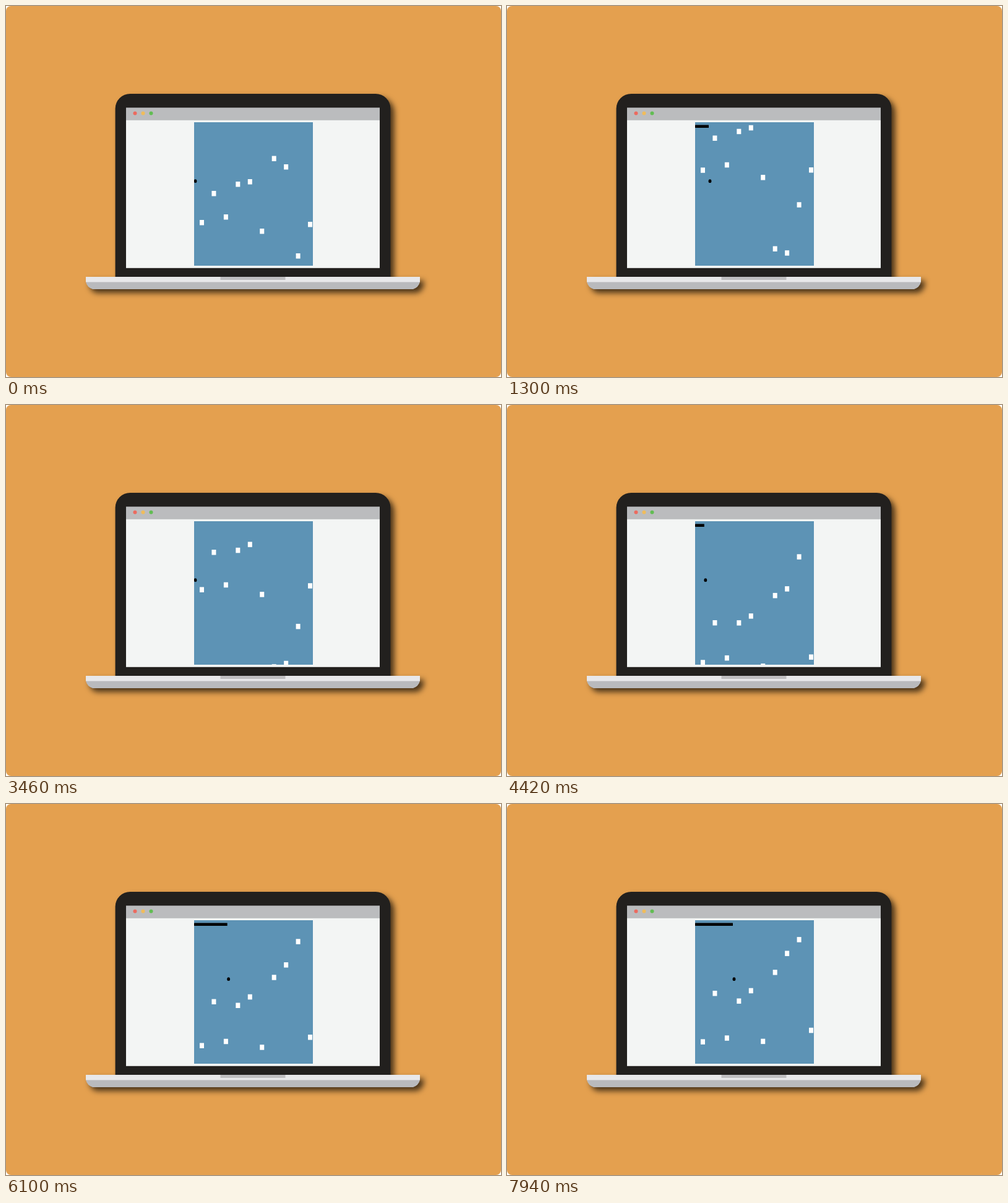
An HTML page for the animation above (8 s loop, 800 px wide and 600 px high).

```html
<!DOCTYPE html>
<html lang="en">
<head>
<meta charset="utf-8">
<title>Dodging game on a laptop</title>
<style>
  html, body { margin: 0; width: 100%; height: 100%; overflow: hidden; background: #fff; }
  svg { display: block; width: 100%; height: 100%; }
</style>
</head>
<body>
<svg viewBox="0 0 800 600" xmlns="http://www.w3.org/2000/svg">
  <defs>
    <filter id="shadow" x="-10%" y="-20%" width="120%" height="150%" color-interpolation-filters="sRGB">
      <feDropShadow dx="6" dy="6" stdDeviation="5" flood-color="#000" flood-opacity=".68"/>
    </filter>
    <clipPath id="field"><rect x="304" y="188" width="192" height="232"/></clipPath>
  </defs>
  <rect width="800" height="600" rx="8" fill="#e4a04f"/>
  <g filter="url(#shadow)">
    <path d="M176.6 438V166a24 24 0 0 1 24-24H597.4a24 24 0 0 1 24 24V438Z" fill="#22201e"/>
    <path d="M129 446H669Q667 455 658 458H140Q131 455 129 446Z" fill="#b9babd"/>
    <rect x="129" y="438" width="540" height="8.5" fill="#e8e8ea"/>
  </g>
  <rect x="346.5" y="438" width="105" height="5" fill="#bfbec0"/>
  <rect x="194" y="184" width="410" height="239.8" fill="#f3f5f4"/>
  <rect x="194" y="164.4" width="410" height="20.4" fill="#bbbcbe"/>
  <circle cx="208.5" cy="173.5" r="3" fill="#ec6a5f"/>
  <circle cx="221.5" cy="173.5" r="3" fill="#f0bc5b"/>
  <circle cx="234.5" cy="173.5" r="3" fill="#62bd53"/>
  <g clip-path="url(#field)">
    <rect x="304" y="188" width="192" height="232" fill="#5d93b5"/>
    <g id="blocks" fill="#fff"></g>
    <rect id="bar" x="304" y="192.4" height="4.6"/>
    <ellipse id="player" cy="283.2" rx="2.4" ry="2.9"/>
  </g>
</svg>
<script>
const LOOP = 8000, STEP = 80, FIRST_HOLD = 180;
const FIELD = { x: 304, y: 188, height: 232 };

// Each block falls steadily and re-enters at the top: [first height, fall per step].
const falls = [
  [158, 9.82], [111, 9.5], [149, 9.85], [96, 9.78], [92, 9.65],
  [172, 9.67], [54.5, 9.73], [68, 9.28], [212, 9.95], [161, 9.6]
];

// The player runs right up to a reach, until a hit sends it back to the left edge.
const RUN_RATE = 1.85;
const attempts = [
  { start: 3, hit: 22, reach: 22 },
  { start: 25, hit: 40, reach: 7 },
  { start: 46, hit: Infinity, reach: 71 }
];
const retreat = { start: 85, length: 10 };

const byId = id => document.getElementById(id);
const clamp = (value, low, high) => Math.min(high, Math.max(low, value));
const bar = byId("bar"), player = byId("player");

const blocks = falls.map((_, i) => {
  const rect = document.createElementNS("http://www.w3.org/2000/svg", "rect");
  rect.setAttribute("x", 313 + i * 19.45);
  rect.setAttribute("width", 7);
  rect.setAttribute("height", 8.5);
  return byId("blocks").appendChild(rect);
});

function playerDistance(n) {
  const { start, reach } = attempts.find(attempt => n < attempt.hit);
  const back = clamp(RUN_RATE * (n - retreat.start), 0, retreat.length);
  return clamp(RUN_RATE * (n - start), 0, reach) - back;
}

function draw(time) {
  const n = time < FIRST_HOLD ? 0 : Math.floor((time - FIRST_HOLD) / STEP) + 1;
  falls.forEach(([first, rate], i) =>
    blocks[i].setAttribute("y", FIELD.y + (first + rate * n) % FIELD.height));
  const distance = playerDistance(n);
  bar.setAttribute("width", distance);
  player.setAttribute("cx", FIELD.x + 2 + distance);
}

const start = performance.now();
function tick() {
  draw((performance.now() - start) % LOOP);
  requestAnimationFrame(tick);
}
tick();
</script>
</body>
</html>
```
